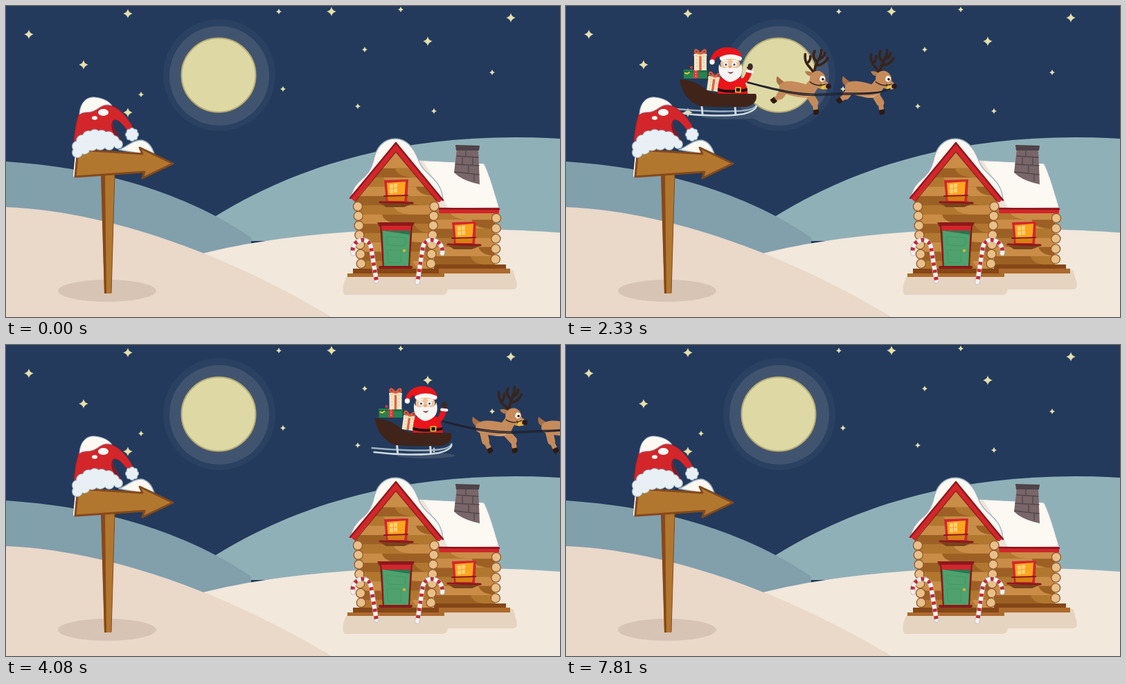
An HTML page for the animation above (7.93 s loop, 800 by 450 pixels).

```html
<!DOCTYPE html>
<html lang="en">
<head>
<meta charset="utf-8">
<title>Sleigh ride</title>
<style>
html, body { margin: 0; width: 100%; height: 100%; overflow: hidden; background: #233a5c; }
svg { display: block; width: 800px; height: 450px; }
</style>
</head>
<body>
<svg id="stage" viewBox="0 0 800 450" xmlns="http://www.w3.org/2000/svg"></svg>
<script>
const RED = '#d3262b', DARK_RED = '#8b191d', SNOW = '#fcf8f2', WOOD = '#b2772f', BARK = '#85491b';
const LIGHT = '#ca8d47', DEEP = '#9d6024', TAN = '#c68b5b', HOOF = '#2c1a14', EDGE = '#9aafbf';

// Small markup helpers
const path = (d, fill, more = '') => `<path d="${d}" fill="${fill}" ${more}/>`;
const line = (d, color, w, more = '') =>
  `<path d="${d}" fill="none" stroke="${color}" stroke-width="${w}" stroke-linecap="round" stroke-linejoin="round" ${more}/>`;
const oval = (x, y, rx, ry, fill, more = '') =>
  `<ellipse cx="${x}" cy="${y}" rx="${rx}" ry="${ry}" fill="${fill}" ${more}/>`;
const dot = (x, y, r, fill, more) => oval(x, y, r, r, fill, more);
const box = (x, y, w, h, fill, more = '') =>
  `<rect x="${x}" y="${y}" width="${w}" height="${h}" fill="${fill}" ${more}/>`;
const outline = (color, w) => `stroke="${color}" stroke-width="${w}" stroke-linejoin="round"`;

function star([x, y], r) {
  const q = r * .2;
  return path(`M${x} ${y - r}Q${x + q} ${y - q} ${x + r} ${y}Q${x + q} ${y + q} ${x} ${y + r}` +
    `Q${x - q} ${y + q} ${x - r} ${y}Q${x - q} ${y - q} ${x} ${y - r}Z`, '#e6dfac');
}

function sky() {
  const big = [[33, 41], [112, 85], [176, 11], [176, 154], [470, 8], [609, 51], [729, 17]];
  const small = [[195, 128], [394, 8], [400, 120], [518, 63], [508, 145], [570, 5], [618, 152], [702, 96]];
  return box(0, 0, 800, 450, '#233a5c') +
    dot(308, 100, 81, '#2b4162') + dot(308, 101, 72, '#41546f') +
    dot(307, 100, 53.5, '#ded9a4', outline('#b9ad74', 2)) +
    big.map(p => star(p, 6.8)).join('') + small.map(p => star(p, 4)).join('');
}

function hills() {
  return path('M290 312C420 228 570 190 735 190Q770 190 800 192V340H290Z', '#90b0b8') +
    path('M0 225C130 234 250 265 354 335V360H0Z', '#829fac') +
    path('M280 359C420 323 620 315 800 328V450H280Z', '#f2e8dc') +
    path('M0 291C150 297 320 360 470 450H0Z', '#ead8c9');
}

function sign() {
  const puffs = [[103, 212, 7], [103, 203, 7], [110, 195, 8], [119, 189, 8], [128, 187, 8], [138, 188, 8],
    [148, 190, 8], [156, 195, 7], [162, 200, 6], [113, 206, 8], [124, 200, 9], [136, 199, 9], [149, 201, 7]];
  const tuft = [...Array(8)].map((_, i) => [182 + 6 * Math.cos(i * Math.PI / 4), 186 + 6 * Math.sin(i * Math.PI / 4), 3]);
  const fluff = list => list.map(p => dot(...p, EDGE, outline(EDGE, 2))).join('') +
    list.map(p => dot(...p, '#e8f0f5')).join('');
  return oval(146, 412, 71, 16, '#d7c4b4') +
    path('M137 242H157L152 416H142Z', WOOD) +
    path('M137 242H143L145 416H142Z', BARK) + line('M157 243L152 415', BARK, 1) +
    line('M101 212L98 246', SNOW, 2) +
    path('M163 208C176 203 183 194 196 194C205 196 211 204 214 214L194 205L197 214Z', SNOW, outline(EDGE, 1.5)) +
    path('M104 208L197 214L193 205L241 228L197 249L200 240L100 247Z', WOOD, outline(BARK, 3)) +
    path('M98 204C99 182 101 168 106 155C119 144 138 136 152 144C167 150 181 168 185 181L178 184' +
      'C169 171 161 161 154 166C151 175 162 184 168 198Z', RED, outline('#a81f26', 1)) +
    path('M154 166C151 176 162 184 168 197C155 187 149 176 154 166Z', '#7d1a24') +
    path('M106 157C107 140 116 131 128 132C140 133 149 138 153 144C139 140 136 148 126 152C119 155 112 152 106 157Z',
      SNOW, outline(EDGE, 1)) +
    oval(140.5, 154, 7.5, 5, '#fff') + oval(128, 162, 4, 2.7, '#fff') +
    fluff(puffs) + fluff([...tuft, [182, 186, 6]]);
}

// Rows of two-tone logs with slanted joints
function logs(x, y, w, rows, h) {
  const tones = [WOOD, LIGHT, DEEP];
  return [...Array(rows)].map((_, i) => {
    const top = y + i * h, cut = x + w * (.25 + (i * 37 % 50) / 100);
    return box(x, top, w, h + .5, tones[i % 3]) +
      path(`M${cut} ${top}H${x + w}V${top + h}H${cut + 30}Q${cut + 4} ${top + h} ${cut} ${top}Z`, tones[(i + 1) % 3]);
  }).join('');
}

const logEnds = (x, y, n, h, lean) => [...Array(n)].map((_, i) =>
  dot(x + lean * i, y + h * i, 6.6, '#e8c08a', outline('#97582a', 1.3))).join('');

function pane(x, y) {
  const lights = [[-8, 8], [-2, 7], [-8, 15], [-2, 14]];
  return path(`M${x - 22} ${y + 34}H${x + 24}L${x + 12} ${y + 39}H${x - 14}Z`, '#794419') +
    path(`M${x - 17} ${y}L${x + 18} ${y - 1}L${x + 16} ${y + 32}H${x - 14}Z`, RED) +
    path(`M${x - 13} ${y + 4}L${x + 14} ${y + 2}L${x + 12} ${y + 30}H${x - 11}Z`, '#ffa51f') +
    path(`M${x - 12} ${y + 23}H${x + 13}L${x + 12} ${y + 30}H${x - 11}Z`, '#d78111') +
    lights.map(([a, b]) => box(x + a - 1, y + b - 2, 5, 6, '#ffcf70', 'rx="1"')).join('') +
    line(`M${x - 17} ${y + 23}L${x + 17} ${y + 22}`, DARK_RED, 2) +
    line(`M${x - 23} ${y + 32}L${x + 24} ${y + 33}`, DARK_RED, 3.2);
}

function cane(d) {
  return line(d, '#b9bcc3', 7) + line(d, '#f2f1f0', 5.6) +
    line(d, '#c72930', 5.8, 'style="stroke-linecap:butt" stroke-dasharray="4.5 6" stroke-dashoffset="-4"');
}

function house() {
  const wall = 'M563 203L623 281L617 290L615 380H514L510 285L502 281Z';
  return `<clipPath id="wall"><path d="${wall}"/></clipPath>` +
    path('M492 391C486 402 485 413 489 418H630Q637 418 638 410H733Q740 409 737 398L732 382Z', '#e5d4c0') +
    logs(618, 296, 88, 6, 13.2) +
    box(618, 374, 104, 6, '#854617') + box(625, 380, 103, 7, '#ac6b2d') +
    path('M590 223L690 228Q697 239 712 292L626 293Z', SNOW, outline(EDGE, 1)) +
    path('M591 223L602 224Q621 252 638 293H627Z', '#efe3d8') +
    path('M624 292H712V300H626Z', RED) + line('M625 293L712 294', DARK_RED, 2.5) +
    path('M651 207H682L684 258Q659 253 647 241Z', '#786669') +
    path('M649 201L684 202L683 209H650Z', '#4e4348') +
    line('M651 217L682 219M649 229L683 231M648 240L683 244M664 209V217M674 219V230M659 218V229M668 231V242M676 244V253', '#52474b', 1.3) +
    logEnds(708, 307, 5, 14.8, -.3) + pane(661, 313) +
    path('M498 278C502 249 522 254 530 226C535 201 548 192 563 192C579 193 589 204 596 224C604 246 629 248 631 281L563 203Z',
      SNOW, outline(EDGE, 1.3)) +
    `<g clip-path="url(#wall)">${logs(500, 208, 126, 13, 13.4)}</g>` +
    line('M500 280L563 204L628 282', RED, 8, 'style="stroke-linecap:butt;stroke-linejoin:miter"') +
    line('M497 278L563 198L631 281', DARK_RED, 2.4) + line('M504 283L563 211L623 283', DARK_RED, 1.2) +
    box(501, 380, 124, 7, '#854617') + box(493, 387, 140, 5, '#ac6b2d') +
    logEnds(508, 290, 7, 13.8, .8) + logEnds(618.5, 290, 7, 13.8, -.8) + pane(563, 252) +
    path('M540 317H587L583 380H544Z', DARK_RED) + path('M536 313H590L587 319H539Z', DARK_RED) +
    path('M542 318H585L584 326H543Z', RED) +
    path('M543 325H584L581 377H546Z', '#2b7650') +
    path('M544 325L583 331L581 376L546 377Z', '#4fa16d') +
    line('M550 333L577 336L576 347L551 346ZM551 353L570 353V371H552Z', '#459663', 1) +
    dot(575, 354, 2, '#f1b52c') + line('M540 378H585', DARK_RED, 4) +
    cane('M501 358C497 338 523 331 527 349L535 398') + cane('M630 358C633 338 606 331 602 349L594 400');
}

function gift(x, y, w, h, tilt = 0) {
  const m = x + w / 2;
  return `<g transform="rotate(${tilt} ${m} ${y + h})">` +
    box(x, y, w, h, '#f4e6c8') + line(`M${x + 4} ${y + 4}V${y + h - 3}M${x + w - 4} ${y + 4}V${y + h - 3}`, '#d8bd83', 1.3, 'stroke-dasharray=".5 4"') +
    box(m - 1.7, y, 3.4, h, '#e2603f') + box(x - .5, y + 1, w + 1, 2.5, '#eddbb8') +
    line(`M${m} ${y}Q${m - 8} ${y - 10} ${m - 8} ${y - 2}ZM${m} ${y}Q${m + 8} ${y - 10} ${m + 8} ${y - 2}Z`, '#dc5a3d', 2.4) + '</g>';
}

function driver() {
  const eye = x => dot(x, 84.5, 3.3, '#fff') + dot(x, 84.8, 1.6, '#2c4f7c');
  return path('M417 104Q413 118 414 130H458L456 117Q451 103 443 102Z', '#ea151b') +
    path('M414 119Q432 124 457 119V123Q434 128 414 123Z', '#191416') +
    box(440, 118, 7, 6.5, '#191416', outline('#f3c432', 1.7)) +
    `<g id="arm">${line('M447 109Q455 111 461 96', '#ea151b', 8)}${line('M458 95L465 97', '#fff', 4)}` +
    `${oval(463, 89, 3.7, 4.7, '#3a2a2c')}${line('M459 90L461 92', '#3a2a2c', 2.5)}</g>` +
    oval(432, 84, 14, 12, '#f1c39b') +
    path('M416 84Q414 96 419 102Q425 109 432 110Q442 108 447 101Q451 93 448 83Q445 91 439 90Q432 86 425 90Q419 91 416 84Z', '#f5f5f4') +
    `<g id="eyes">${eye(426)}${eye(438)}</g>` +
    `<g id="shut">${line('M423 85Q426 83 429 85M435 85Q438 83 441 85', '#c38d69', 1.2)}</g>` +
    line('M422 80L428 79M436 79L442 80', '#fff', 2) + oval(432, 88, 2.6, 2, '#e5a47d') +
    path('M428 95Q432 97 437 95Q433 101 428 95Z', '#77282b') +
    path('M403 79C406 65 418 58 432 60C444 61 449 68 449 76H418C415 71 411 73 410 80Z', '#ea151b') +
    line('M420 76Q432 70 446 76', '#f8f8f7', 6) + dot(406, 81, 3.7, '#f8f8f7');
}

function sleigh() {
  return oval(433, 160, 42, 4, '#3c506c') +
    line('M355 149C385 152 430 154 454 151Q468 149 470 143', '#9eb2c0', 2.3) +
    line('M358 155C390 159 430 160 452 156Q468 152 470 145', '#ced9df', 2.5) +
    line('M391 144L392 156M439 145L440 157', '#d2dde2', 3) +
    box(365, 92, 34, 13, '#278150') + line('M365 95H399', '#1f6a43', 2) +
    box(379, 92, 7, 13, '#d93a36') + line('M382.500 93V104', '#f4d7b5', 1.2, 'stroke-dasharray="1 3"') +
    line('M367 97L370 98L373 96', '#f1cb38', 2) + dot(376, 89, 2, '#db3d3a') +
    gift(380, 69, 18, 24) + gift(398, 102, 17, 21, 8) + driver() +
    path('M359 106C370 106 386 111 396 120Q403 127 420 127L469 127C473 135 466 145 453 146Q420 147 388 145C371 138 362 124 359 106Z', '#402419');
}

function deer(dx) {
  return `<g transform="translate(${dx} 0)"><g class="legs"></g><g class="trunk">` +
    path('M503 121Q494 118 495 108Q500 111 508 114Z', '#a96f45') +
    path('M502 119C508 108 526 109 538 109L543 99L558 105Q554 115 553 121C549 130 531 130 515 130Q500 130 502 119Z', TAN) +
    path('M526 129Q541 129 551 119Q547 131 526 129Z', '#dea574') +
    line('M545 90C538 82 528 82 526 67M532 79Q536 74 534 68M546 88C541 77 551 68 547 55M545 73Q536 69 538 59M547 78Q556 75 559 64M548 68Q553 65 553 58', '#392318', 3.6) +
    path('M544 95Q535 97 532 91Q538 88 545 91Z', '#b47a4d') +
    path('M541 97Q542 86 553 85Q563 87 565 97Q572 99 572 105Q566 112 554 109Q542 107 541 97Z', TAN) +
    oval(566, 104, 6.5, 4.5, '#dda878') + dot(570.500, 103, 3.8, HOOF) +
    oval(559, 95, 3.7, 4.2, '#fff') + dot(560, 95.5, 1.8, '#2d1b17') +
    line('M543 104Q555 109 566 101M559 103L563 110', '#352925', 1.4) + dot(563, 107, 2.8, '#f0c520') + '</g></g>';
}

document.getElementById('stage').innerHTML = sky() + hills() + house() +
  `<g id="team">${sleigh()}${deer(0)}${deer(95)}${line('', '#20222f', 1.5, 'id="reins"')}</g>` + sign();

const $ = id => document.getElementById(id);
const LOOP = 7930, STEP = LOOP / 68, STRIDE = 14 / 3;
const route = [[0, -684], [14, -341], [20, -195], [28, 0], [35, 173.5], [44, 389], [68, 965]];

// phase, tilt, shift x, shift y, then hip-knee-hoof and shoulder-knee-hoof
const poses = [
  [0, 0, 0, 0, 509, 122, 512, 137, 504, 148, 544, 122, 556, 136, 567, 144],
  [.286, 15, 1, 1, 511, 121, 504, 130, 496, 136, 546, 127, 554, 140, 556, 152],
  [.5, 10, 3, 1, 515, 122, 519, 139, 525, 151, 548, 126, 559, 138, 561, 151],
  [.76, 2, 1, 0, 511, 122, 517, 139, 513, 151, 545, 122, 561, 134, 566, 146],
  [1, 0, 0, 0, 509, 122, 512, 137, 504, 148, 544, 122, 556, 136, 567, 144]
];

// Linear mix of the rows around key k; the first column is the key
function mix(rows, k) {
  const i = Math.max(1, rows.findIndex(r => r[0] > k)), a = rows[i - 1], b = rows[i];
  const u = (k - a[0]) / (b[0] - a[0]);
  return a.slice(1).map((v, j) => v + (b[j + 1] - v) * u);
}

function leg(hx, hy, kx, ky, fx, fy) {
  const a = Math.atan2(fy - ky, fx - kx) * 180 / Math.PI;
  return line(`M${hx} ${hy}L${kx} ${ky}`, TAN, 11) + line(`M${kx} ${ky}L${fx} ${fy}`, TAN, 7) +
    `<g transform="translate(${fx} ${fy}) rotate(${a})">${path('M-2 -4H3Q6 -3 5 4H-2Z', HOOF)}</g>`;
}

function draw(now) {
  const k = Math.min(67, Math.floor((now % LOOP + 6) / STEP));
  const phase = k / STRIDE % 1;
  const [tilt, dx, dy, ...joints] = mix(poses, phase);
  $('team').setAttribute('transform', `translate(${mix(route, k)[0]} 0)`);
  const limbs = leg(...joints.slice(0, 6)) + leg(...joints.slice(6));
  document.querySelectorAll('.legs').forEach(g => g.innerHTML = limbs);
  document.querySelectorAll('.trunk').forEach(g =>
    g.setAttribute('transform', `translate(${dx} ${dy}) rotate(${tilt} 526 119)`));
  const drop = tilt * .85, sag = tilt * .4;
  const rein = y => `M457 ${110 + y / 2}C490 ${118 + y} 530 ${124 + y + sag} 570 ${121 + y + sag}` +
    `S640 ${117 + y + drop} 663 ${107 + drop}`;
  $('reins').setAttribute('d', rein(0) + rein(2));
  $('arm').setAttribute('transform', `rotate(${Math.cos(phase * 2 * Math.PI) * 5 - 4} 447 109)`);
  const blink = k === 14;
  $('eyes').style.display = blink ? 'none' : '';
  $('shut').style.display = blink ? '' : 'none';
}

function tick() {
  draw(performance.now());
  requestAnimationFrame(tick);
}
tick();
</script>
</body>
</html>
```
